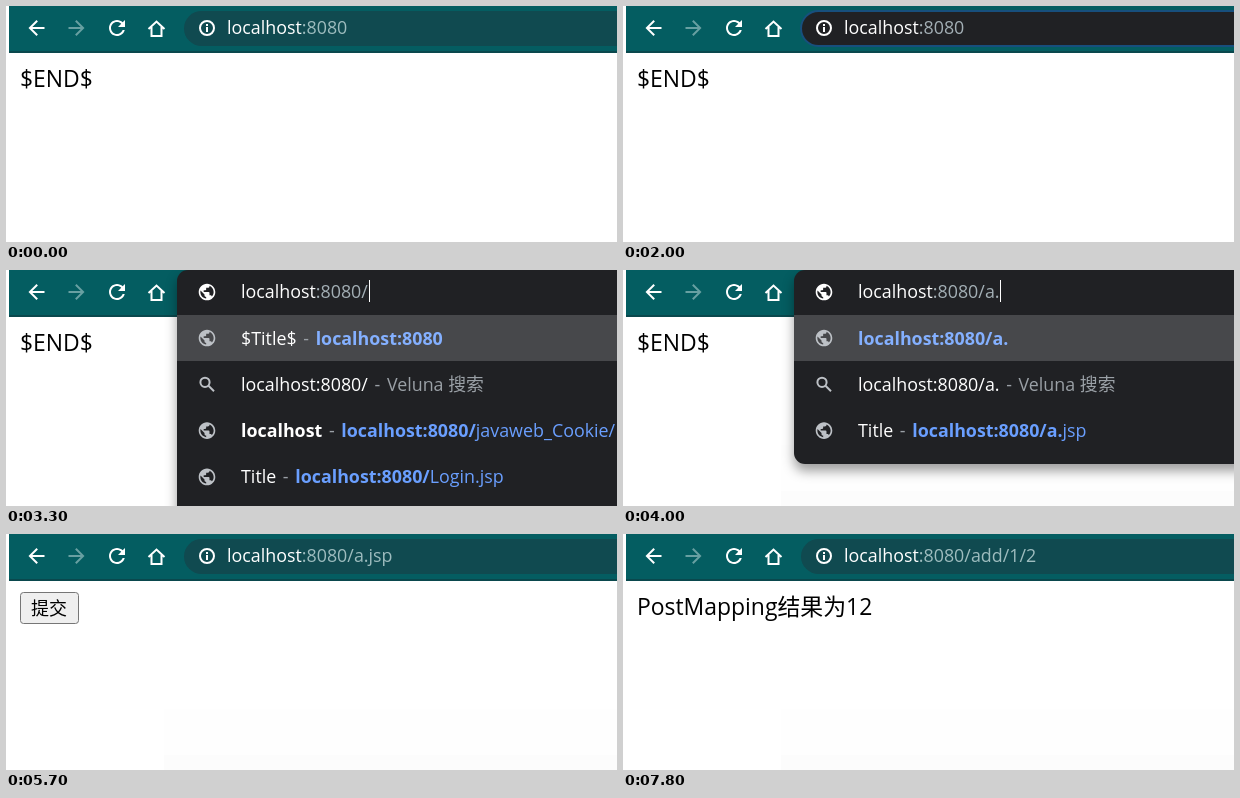
An HTML page for the animation above (8000 ms loop, 611x236 px).

```html
<!DOCTYPE html>
<html lang="zh">
<head>
<meta charset="utf-8">
<style>
html, body { margin: 0; width: 100%; height: 100%; overflow: hidden; background: #fff; }
svg { display: block; width: 611px; height: 236px; font: 17.85px "Open Sans", "Noto Sans CJK SC", "Noto Sans CJK", sans-serif; }
.page { font-size: 22.9px; fill: #000; }
.white { fill: #fff; }
.dim { fill: #9aa0a6; }
.typed { fill: #a3afb5; }
.port { fill: #9dbcbe; }
.url { fill: #6a9fff; }
.bold { font-weight: 700; }
.hot .url { fill: #84b0ff; }
.drop { filter: drop-shadow(0 7px 6px rgba(0, 0, 0, .38)); }
.line { fill: none; stroke: #fff; stroke-width: 2; }
</style>
</head>
<body>
<svg id="stage" viewBox="0 0 611 236"></svg>
<script>
const LOOP = 8000;
const HOST = 'localhost:8080/';
const stage = document.getElementById('stage');

const ARROW = 'M20 11H7.83l5.59-5.59L12 4l-8 8 8 8 1.41-1.41L7.83 13H20v-2z';
const RELOAD = 'M17.65 6.35C16.2 4.9 14.21 4 12 4c-4.42 0-7.99 3.58-7.99 8s3.57 8 7.99 8c3.73 0 6.84-2.55 7.73-6h-2.08c-.82 2.33-3.04 4-5.65 4-3.31 0-6-2.69-6-6s2.69-6 6-6c1.66 0 3.14.69 4.22 1.78L13 11h7V4l-2.35 2.35z';
const GLOBE = 'M12 2C6.48 2 2 6.48 2 12s4.48 10 10 10 10-4.48 10-10S17.52 2 12 2zm-1 17.93c-3.95-.49-7-3.85-7-7.93 0-.62.08-1.21.21-1.79L9 15v1c0 1.1.9 2 2 2v1.93zm6.9-2.54c-.26-.81-1-1.39-1.9-1.39h-1v-3c0-.55-.45-1-1-1H8v-2h2c.55 0 1-.45 1-1V7h2c1.1 0 2-.9 2-2v-.41c2.93 1.19 5 4.06 5 7.41 0 2.08-.8 3.97-2.1 5.39z';

const rect = (x, y, w, h, fill, extra = '') =>
  `<rect x="${x}" y="${y}" width="${w}" height="${h}" fill="${fill}" ${extra}/>`;
const icon = (d, x, y, scale, fill) =>
  `<path d="${d}" fill="${fill}" transform="translate(${x} ${y}) scale(${scale}) translate(-12 -12)"/>`;
const text = (x, y, body, cls = '') => `<text x="${x}" y="${y}" class="${cls}">${body}</text>`;
const span = (cls, s) => `<tspan class="${cls}">${s}</tspan>`;
const link = s => span('url bold', s);
const DASH = '<tspan class="dim" dx="2"> - </tspan><tspan dx="2">\u200b</tspan>';
const titled = (title, url) => ['globe', span('white', title) + DASH + url];
const search = s => ['search', span('white', s) + DASH + span('dim', 'Veluna 搜索')];

// Suggestions shown for what is typed after the host
function suggestions(typed) {
  const url = HOST + typed;
  if (!typed) return [
    titled('$Title$', link('localhost:8080')),
    search(url),
    titled('<tspan class="bold">localhost</tspan>', link(url) + span('url', 'javaweb_Cookie/')),
    titled('Title', link(url) + span('url', 'Login.jsp')),
    titled('Title', link(url) + span('url', 'a.jsp'))
  ];
  const match = titled('Title', link(url) + span('url', 'a.jsp'.slice(typed.length)));
  return typed.length < 4 ? [['globe', link(url)], search(url), match] : [match, search(url)];
}

function searchIcon(y) {
  return `<g class="line" style="stroke:#bdc1c6"><circle cx="199" cy="${y - 2}" r="4.6"/><path d="M202.5 ${y + 1.5}l5.5 5.5"/></g>`;
}

function dropdown({ typed, caret }) {
  const rows = suggestions(typed);
  let out = `<g class="drop">${rect(171, 0, 470, 56 + 46 * rows.length, '#202124', 'rx="11"')}</g>`
    + rect(171, 45, 440, 46, '#47484b')
    + icon(GLOBE, 201, 22, .83, '#fff')
    + text(235, 28, span('white', 'localhost') + span('typed', ':8080/' + typed));
  if (caret) out += rect(caret, 10, 1, 22, '#fff');
  rows.forEach(([kind, body], i) => {
    const y = 68 + 46.3 * i;
    out += kind === 'globe' ? icon(GLOBE, 201, y, .83, '#bdc1c6') : searchIcon(y);
    out += text(235, Math.round(y + 6.6), body, i ? '' : 'hot');
  });
  return out;
}

function addressBar({ path = '', focus, ring, selected, caret }) {
  return rect(178, 5, 470, 35, focus ? '#202124' : '#104a50',
      `rx="17.5" ${ring ? 'stroke="#174f7d" stroke-width="2"' : ''}`)
    + '<circle cx="201" cy="22" r="7" class="line"/>'
    + rect(200, 21, 2, 5, '#fff') + rect(200, 18, 2, 2, '#fff')
    + (selected ? rect(221, 10, 121, 25, '#0078d7') : '')
    + text(221, 28, span('white', 'localhost')
      + span(selected ? 'white' : focus ? 'typed' : 'port', ':8080' + path))
    + (caret ? rect(caret, 10, 1, 22, '#fff') : '');
}

function button({ fill = '#efefef', border = '#767676' }) {
  return rect(14.5, 58.5, 58, 31, fill, `rx="3" stroke="${border}"`)
    + '<text x="25" y="81" font-size="18">提交</text>';
}

const toolbar = rect(3, 0, 608, 46, '#045d61') + rect(3, 45, 608, 2, '#0a484d')
  + icon(ARROW, 30.5, 22, 1, '#fff')
  + icon(ARROW, 70.5, 22, -1, '#68a0a2')
  + icon(RELOAD, 111, 22, 1, '#fff')
  + '<path class="line" d="M142.5 23l8-7.5 8 7.5M145.5 21v9h10v-9"/>';

const hover = { fill: '#e5e5e5', border: '#4f4f4f' };
const press = { fill: '#f5f5f5', border: '#8d8d8d' };
const steps = [
  [0, {}],
  [600, { focus: 1, selected: 1 }],
  [700, { focus: 1, ring: 1, selected: 1 }],
  [1500, { focus: 1, ring: 1, caret: 342 }],
  [2000, { focus: 1, ring: 1 }],
  [2400, { typed: '', caret: 363 }],
  [2900, { typed: '' }],
  [3300, { typed: '', caret: 363 }],
  [3800, { typed: 'a', caret: 373 }],
  [4000, { typed: 'a.', caret: 377 }],
  [4300, { typed: 'a.j', caret: 382 }],
  [4800, { typed: 'a.js', caret: 390 }],
  [4900, { typed: 'a.jsp', caret: 401 }],
  [5400, { typed: 'a.jsp' }],
  [5600, { path: '/a.jsp' }],
  [5700, { path: '/a.jsp', form: {} }],
  [7200, { path: '/a.jsp', form: hover }],
  [7600, { path: '/a.jsp', form: press }],
  [7800, { path: '/add/1/2', result: 1 }]
];

function draw([start, s]) {
  const shade = start < 3800 ? '' : rect(158, 175, 453, 61, '#fefefe') + rect(158, 221, 453, 15, '#fcfcfc');
  const page = s.form ? button(s.form)
    : text(14, 81, s.result ? 'PostMapping结果为12' : '$END$', 'page');
  stage.innerHTML = rect(0, 0, 611, 236, '#fff') + shade + page + toolbar
    + (s.typed === undefined ? addressBar(s) : dropdown(s));
}

let shown;
function tick() {
  const t = performance.now() % LOOP;
  const step = steps.filter(([start]) => start <= t).pop();
  if (step !== shown) draw(shown = step);
  requestAnimationFrame(tick);
}
tick();
</script>
</body>
</html>
```
